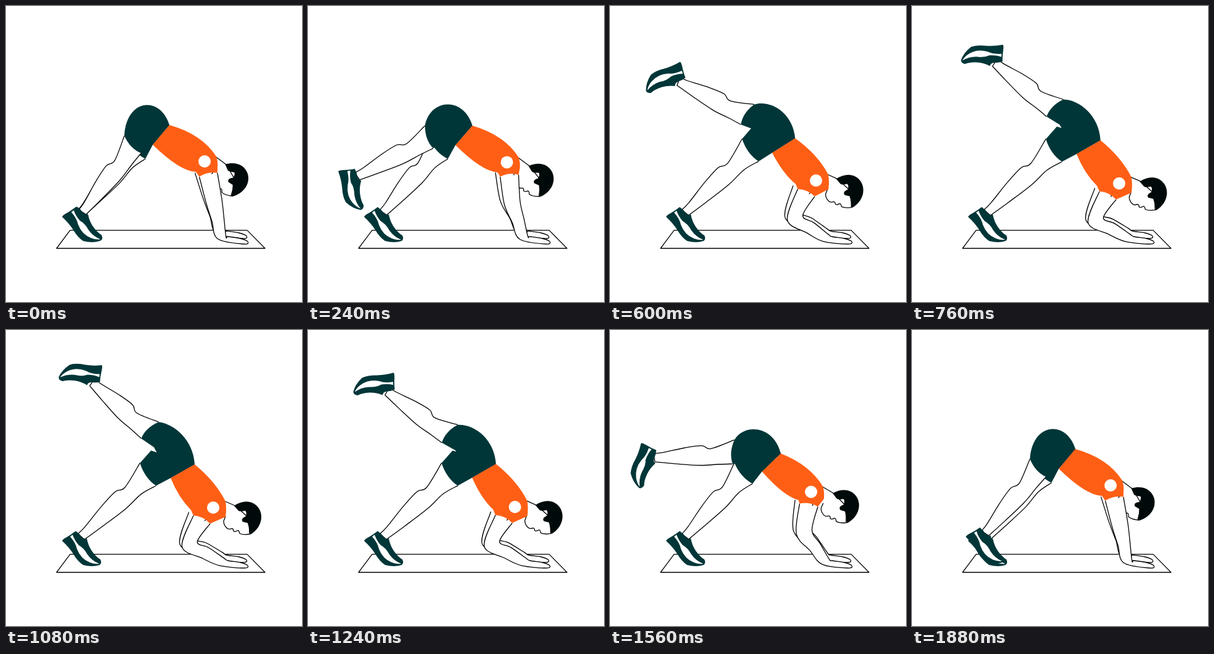
Animation of 480x480 px, one loop 1.92 s. Source, as an HTML page:

```html
<!DOCTYPE html>
<html lang="en">
<head>
<meta charset="utf-8">
<title>Leg raise exercise</title>
<style>
  html, body { margin: 0; width: 100%; height: 100%; overflow: hidden; background: #fff; }
  svg { display: block; width: 100%; height: 100%; }
  .skin { fill: #fff; stroke: #000; stroke-width: 1.3; stroke-linejoin: round; }
  .dark { fill: #003638; }
  .hair { fill: #000a0a; }
  .shirt { fill: #ff5f15; }
  .white { fill: #fff; }
</style>
</head>
<body>
<svg viewBox="0 0 480 480">
  <defs>
    <g id="shoe">
      <path class="dark" d="M-31 7C-30 3 -20 0 -9 -9Q-3 -5 1 1Q5 5 9 3Q11 14 17 23Q24 33 31 37Q34 43 30 46Q18 50 3 46Q-6 40 -13 28Q-20 17 -31 7Z"/>
      <path class="white" d="M-18 0Q-9 10 -7 20Q-1 36 14 42Q22 45 29 44Q17 39 10 29Q4 18 -4 14Q-11 6 -14 -3Z"/>
    </g>
    <g id="head">
      <path class="skin" d="M0 0L1 26C-5 27 -11 27 -15 25Q-16 20 -18 20Q-23 23 -25 21Q-25 17 -28 17Q-33 19 -36 16Q-41 11 -41 5L-38 -3"/>
      <path class="hair" d="M-24 -20C-9 -30 7 -29 16 -16C25 -2 19 17 2 27Q1 17 -2 8L-10 6Q-14 1 -5 -3Q-3 -10 -6 -12Q-15 -10 -17 -12Z"/>
    </g>
  </defs>
  <path class="skin" d="M104 363.6H391L420 393H82Z"/>
  <path id="standLeg" class="skin"/>
  <use id="standShoe" href="#shoe"/>
  <path id="farShorts" class="dark"/>
  <path id="raisedLeg" class="skin"/>
  <use id="raisedShoe" href="#shoe"/>
  <path id="nearShorts" class="dark"/>
  <path id="farArm" class="skin"/>
  <path id="neck" class="skin"/>
  <use id="face" href="#head"/>
  <path id="nearArm" class="skin"/>
  <path id="torso" class="shirt"/>
  <circle id="badge" class="white" r="10"/>
</svg>
<script>
const LOOP = 1920, STEP = 40, PEAK = 972;
const SHIN = 94, ARM_BONE = 59.5;
const ANKLE = [122, 335], WRIST = [350, 376];

// Leg profile along the shin, from the back of the knee to the ankle and back up.
const CALF = [[0, 0], [14, 7], [42, 8], [80, 6], [SHIN, 7]];
const FRONT = [[SHIN, -7], [62, -15], [22, -24], [-8, -27]];
const HAND = [[36, 10], [42, 6], [30, 1], [10, -2]];

const el = id => document.getElementById(id);
const setPath = (id, d) => el(id).setAttribute('d', d);
const moveTo = (id, p, turn = 0) =>
  el(id).setAttribute('transform', `translate(${fmt(p)}) rotate(${turn})`);
const fmt = p => p.map(v => v.toFixed(2)).join(' ');
const rad = deg => deg * Math.PI / 180;
const smooth = x => x * x * (3 - 2 * x);
const mix = (a, b, k) => a.map((v, i) => v + (b[i] - v) * k);
const along = (p, dir, k) => p.map((v, i) => v + dir[i] * k);
const sub = (a, b) => a.map((v, i) => v - b[i]);
const unit = v => v.map(x => x / Math.hypot(...v));
const ray = angle => [Math.cos(angle), Math.sin(angle)];
const side = ([x, y]) => [y, -x];
const line = (...pts) => pts.map(p => 'L' + fmt(p)).join('');
const quad = (c, p) => `Q${fmt(c)} ${fmt(p)}`;

// Smooth curve through points, starting at the first one.
function curve(pts) {
  let d = '';
  for (let i = 0; i < pts.length - 1; i++) {
    const b = pts[i], c = pts[i + 1];
    const a = pts[i - 1] || b, e = pts[i + 2] || c;
    d += `C${fmt(along(b, sub(c, a), 1 / 6))} ${fmt(along(c, sub(e, b), -1 / 6))} ${fmt(c)}`;
  }
  return d;
}

// The leg is rigid: its trouser hem is fixed relative to the shin.
function makeLeg(knee, angle, length, hemWidth) {
  const dir = ray(angle), normal = [-dir[1], dir[0]];
  const at = ([x, y]) => along(along(knee, dir, x * length / SHIN), normal, y);
  const back = at([-40, 8]), front = at([-31, -hemWidth]);
  return {
    dir, back, front,
    ankle: at([SHIN, 0]),
    hem: quad(along(mix(back, front, .5), dir, 8), back),
    path: 'M' + fmt(back) + curve([back, ...CALF.map(at)]) + line(at(FRONT[0]))
      + curve([...FRONT.map(at), front])
  };
}

// Two equal bones; the elbow bends towards the feet.
function makeArm(shoulder, wrist) {
  const reach = sub(wrist, shoulder), axis = unit(reach);
  const bend = Math.sqrt(Math.max(0, ARM_BONE ** 2 - Math.hypot(...reach) ** 2 / 4));
  const elbow = along(mix(shoulder, wrist, .5), side(axis), -bend);
  const upper = unit(sub(elbow, shoulder)), fore = unit(sub(wrist, elbow));
  const sleeve = along(shoulder, upper, 15);
  const stations = [
    [sleeve, upper, 15], [elbow, axis, 13],
    [mix(elbow, wrist, .5), fore, 10], [wrist, fore, 7]
  ];
  const edge = sign => stations.map(([p, dir, w]) => along(p, side(dir), sign * w));
  const inner = edge(-1), outer = edge(1);
  const hand = HAND.map(p => along(p, wrist, 1));
  return {
    inner: inner[0], outer: outer[0], sleeve,
    path: 'M' + fmt(inner[0]) + curve([...inner, ...hand, ...outer.reverse()])
  };
}

function draw(time) {
  const phase = 1 - Math.abs(time - PEAK) / PEAK;
  const swing = smooth(1 - (1 - phase) ** 1.45);
  const lean = smooth(swing ** 1.6);
  const pose = (low, high) => mix(low, high, lean);

  const standKnee = pose([178, 254], [193, 255]);
  const shin = sub(ANKLE, standKnee);
  const stand = makeLeg(standKnee, Math.atan2(shin[1], shin[0]), Math.hypot(...shin), 36);

  const hip = pose([225, 200], [262, 207]);
  const knee = along(hip, ray(rad(134 + 102 * swing)), 70 + 18 * swing ** 3);
  const raised = makeLeg(knee, rad(122 + 93 * swing), 99 - 11 * swing, 30);

  setPath('standLeg', stand.path);
  moveTo('standShoe', ANKLE);
  setPath('raisedLeg', raised.path);
  moveTo('raisedShoe', raised.ankle, 93 * swing + 40 * swing ** 2);

  const waistBack = pose([265, 193], [306, 218]);
  const waistFront = pose([238, 225], [267, 240]);
  setPath('farShorts', 'M' + fmt(stand.back)
    + line(along(stand.back, stand.dir, -27), waistBack, waistFront, stand.front)
    + stand.hem);
  setPath('nearShorts', 'M' + fmt(raised.back)
    + `C${fmt(pose([195, 150], [272, 152]))} ${fmt(pose([250, 145], [304, 178]))} ${fmt(waistBack)}`
    + line(waistFront, along(raised.front, raised.dir, -25), raised.front) + raised.hem);

  const shoulder = pose([325, 259], [324, 294]);
  const near = makeArm(shoulder, WRIST);
  const far = makeArm(along(shoulder, [-8, -7], 1), along(WRIST, [-2, -9], 1));
  setPath('nearArm', near.path);
  setPath('farArm', far.path);

  const collar = pose([341, 244], [356, 278]);
  const chest = pose([343, 262], [356, 303]);
  setPath('torso', 'M' + fmt(waistBack)
    + quad(pose([318, 208], [340, 246]), collar)
    + quad(mix(collar, chest, .5).map((v, i) => v + (i ? 0 : 2)), chest)
    + line(near.outer) + quad(along(near.sleeve, sub(near.sleeve, shoulder), -.4), near.inner)
    + line(pose([308, 269], [300, 292]))
    + quad(pose([282, 268], [280, 272]), waistFront) + 'Z');

  const head = [372 + 22 * swing, 283 + 22 * lean ** 1.5];
  const tilt = 18 * (1 - swing) ** 2;
  const nape = along(along(head, ray(rad(tilt)), -22), ray(rad(tilt + 90)), -20);
  setPath('neck', 'M' + fmt(along(collar, [-3, -1], 1)) + line(nape, head));
  moveTo('face', head, tilt);
  el('neck').style.strokeLinecap = 'round';

  moveTo('badge', pose([322, 252], [336, 288]));
}

const origin = performance.now();
function tick() {
  const time = (performance.now() - origin) % LOOP;
  draw(Math.floor(time / STEP) * STEP);
  requestAnimationFrame(tick);
}
tick();
</script>
</body>
</html>
```
